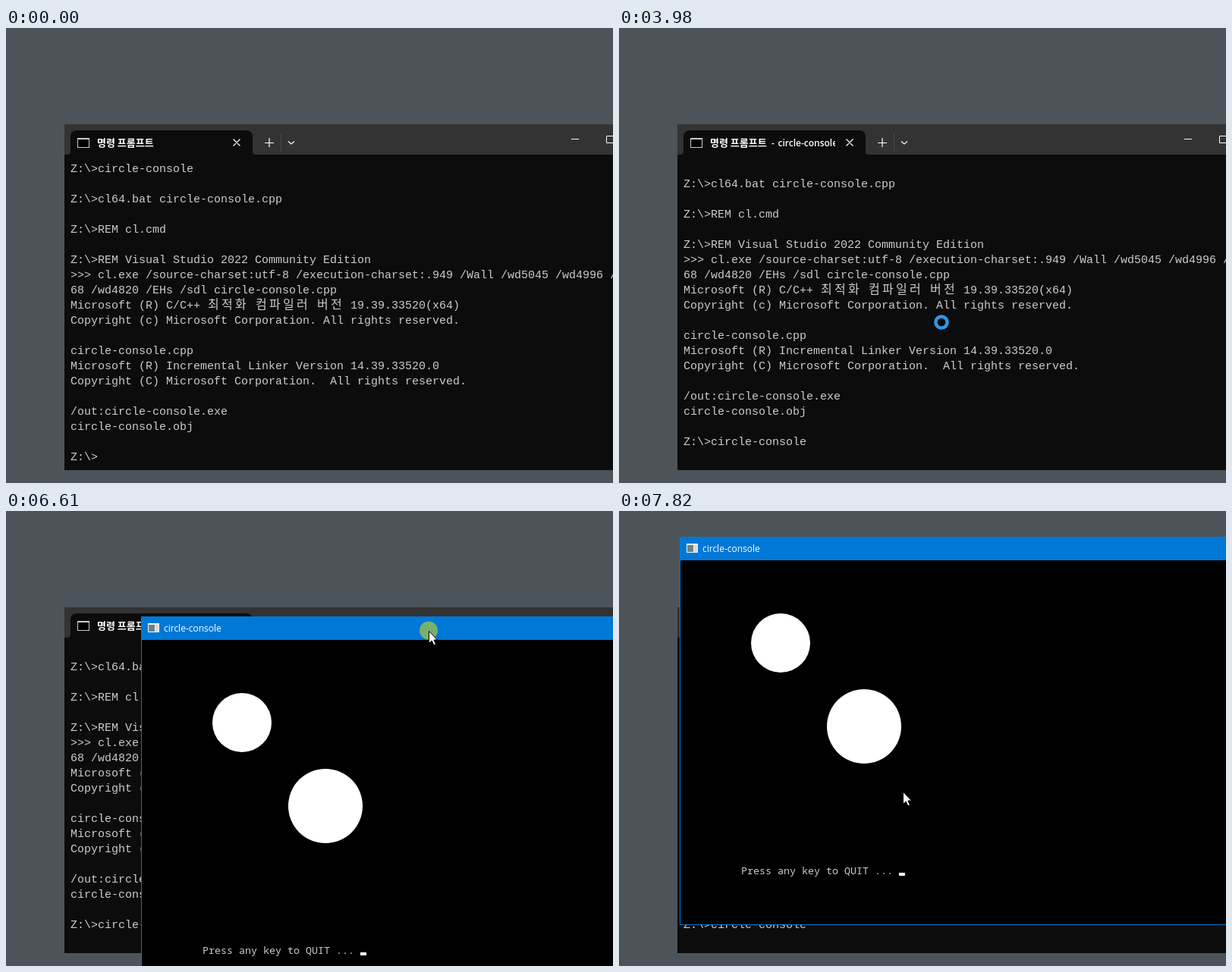
An HTML page with a canvas that plays this animation: 800x600 px, repeating every 8000 ms.

```html
<!DOCTYPE html>
<html lang="ko">
<head>
<meta charset="utf-8">
<title>circle-console</title>
<style>
html, body { margin: 0; height: 100%; overflow: hidden; background: #4c545a; }
canvas { display: block; }
</style>
</head>
<body>
<canvas id="stage" width="800" height="600"></canvas>
<script>
const ctx = document.getElementById('stage').getContext('2d');
const LOOP = 8000, BLUE = '#0078d7';
const MONO = '"Liberation Mono", monospace';
const SANS = '"Open Sans", "Noto Sans CJK KR", "Noto Sans CJK", sans-serif';
const HANGUL = '"Noto Sans CJK KR", "Noto Sans CJK", sans-serif';

const log = String.raw`Z:\>circle-console

Z:\>cl64.bat circle-console.cpp

Z:\>REM cl.cmd

Z:\>REM Visual Studio 2022 Community Edition
>>> cl.exe /source-charset:utf-8 /execution-charset:.949 /Wall /wd5045 /wd4996 /wd46
68 /wd4820 /EHs /sdl circle-console.cpp
Microsoft (R) C/C++ 최적화 컴파일러 버전 19.39.33520(x64)
Copyright (c) Microsoft Corporation. All rights reserved.

circle-console.cpp
Microsoft (R) Incremental Linker Version 14.39.33520.0
Copyright (C) Microsoft Corporation.  All rights reserved.

/out:circle-console.exe
circle-console.obj
`.split('\n');

function rect(x, y, w, h, color) {
  ctx.fillStyle = color;
  ctx.fillRect(x, y, w, h);
}

function disc(x, y, r, color) {
  ctx.fillStyle = color;
  ctx.beginPath();
  ctx.arc(x, y, r, 0, 7);
  ctx.fill();
}

function text(s, x, y, font, color) {
  ctx.font = font;
  ctx.fillStyle = color;
  ctx.fillText(s, x, y);
}

// Each line is a list of coordinates: [x, y, x, y, ...]
function strokes(color, width, ...lines) {
  ctx.strokeStyle = color;
  ctx.lineWidth = width;
  ctx.beginPath();
  for (const p of lines)
    for (let i = 0; i < p.length; i += 2)
      i ? ctx.lineTo(p[i], p[i + 1]) : ctx.moveTo(p[i], p[i + 1]);
  ctx.stroke();
}

// Hangul takes two 9 px cells
function termLine(s, y) {
  let x = 85;
  for (const run of s.match(/[가-힣]|[^가-힣]+/g) || []) {
    const wide = run >= '가';
    text(run, x + (wide ? 1 : 0), y, wide ? '300 16px ' + HANGUL : '15px ' + MONO, '#ccc');
    x += wide ? 18 : run.length * 9;
  }
}

function terminal(t) {
  const focus = t >= 1150 && t < 3980, running = t >= 3160;
  if (focus) rect(76, 126, 724, 458, BLUE);
  rect(77, 127, 723, 456, '#0c0c0c');
  rect(77, 127, 723, 40, focus ? '#2d2d2d' : '#333');

  ctx.fillStyle = '#0c0c0c';
  ctx.beginPath();
  ctx.moveTo(81, 167);
  ctx.quadraticCurveTo(85, 167, 85, 163);
  ctx.arcTo(85, 135, 93, 135, 8);
  ctx.arcTo(325, 135, 325, 143, 8);
  ctx.lineTo(325, 163);
  ctx.quadraticCurveTo(325, 167, 329, 167);
  ctx.fill();

  rect(94, 145, 16, 13, '#ccc');
  rect(95, 147, 14, 10, '#000');
  text('명령 프롬프트', 120, 156, 'bold 13px ' + HANGUL, '#fff');
  if (running) {
    ctx.save();
    ctx.beginPath();
    ctx.rect(200, 135, 85, 32);
    ctx.clip();
    text('-', 201, 156, '600 12px ' + SANS, '#fff');
    text('circle-console', 209.5, 156, '600 12px ' + SANS, '#fff');
    ctx.restore();
  }

  strokes('#fff', 1.2, [299.5, 146.5, 308.5, 155.5], [308.5, 146.5, 299.5, 155.5],
    [341, 151.5, 353, 151.5], [347, 145, 347, 157], [372, 149.5, 376, 153, 380, 149.5]);
  strokes('#4a4a4a', 1, [362.5, 139, 362.5, 163]);
  strokes('#fff', 1, [745, 146.5, 755, 146.5], [800, 142.5, 791.5, 142.5, 791.5, 151.5, 800, 151.5]);

  const command = t < 2160 ? '' : t < 2560 ? 'cl64.bat circle-console.cpp' : 'circle-console';
  const rows = [...log, 'Z:\\>' + command];
  rows.forEach((s, i) => {
    const row = running ? i - 1 : i;
    if (row >= 0) termLine(s, 190 + row * 20);
  });

  const caretOn = focus && !(t >= 1540 && t < 1960) && !(t >= 2960 && t < 3160) && !(t >= 3370 && t < 3580);
  if (caretOn) rect(running ? 85 : 121 + command.length * 9, 555, 1, 20, '#fff');
}

function popup([x, y], t) {
  rect(x, y, 800, 512, BLUE);
  rect(x + 1, y + 31, 800, 480, '#000');

  rect(x + 9, y + 9, 15, 12, '#f2f2f2');
  rect(x + 10, y + 11, 8, 9, '#6d8088');
  rect(x + 19, y + 11, 4, 9, '#d5dade');
  text('circle-console', x + 30, y + 20, '12px ' + SANS, '#fff');

  if (t < 4400) return;
  disc(x + 133, y + 140, 39, '#fff');
  disc(x + 243, y + 250, 49, '#fff');
  text('Press any key to QUIT ...', x + 81, y + 445, '300 13.333px "Noto Sans Mono", ' + MONO, '#ccc');
  rect(x + 289, y + 443, 8, 4, '#fff');
}

function pointer([x, y], pressed) {
  if (pressed) disc(x, y - 0.5, 12, 'rgba(200,213,40,.6)');
  ctx.save();
  ctx.translate(x + 0.5, y + 0.5);
  ctx.beginPath();
  [[0, 0], [0, 16], [3.7, 12.6], [6.4, 18.4], [9, 17.3], [6.4, 11.6], [11, 11.4]]
    .forEach(p => ctx.lineTo(...p));
  ctx.closePath();
  ctx.fillStyle = '#fff';
  ctx.fill();
  ctx.strokeStyle = '#000';
  ctx.lineWidth = 1;
  ctx.stroke();
  ctx.restore();
}

const lerp = (a, b, k) => a.map((v, i) => Math.round(v + (b[i] - v) * k));
const tick = (t, start) => Math.min(5, Math.floor((t - start) / 200));

const REST = [425, 388], GRAB = [567, 180];
const glide = [[524, 119], [489, 81], [456, 53], [445, 105], [402, 270], [374, 370]];
const drag = [[146, 100], [113, 62], [80, 34]];

function pointerAt(t) {
  if (t < 1350) return lerp([792, 439], REST, Math.min(1, tick(t, 350) / 3));
  if (t < 5610) return REST;
  if (t < 6610) return lerp(REST, GRAB, Math.min(1, (tick(t, 5610) + 1) / 4));
  return t < 6820 ? [557, 158] : glide[tick(t, 6820)];
}

function popupAt(t) {
  if (t < 6610) return [188, 161];
  return t < 6820 ? [178, 139] : drag[Math.min(2, tick(t, 6820))];
}

function draw(t) {
  rect(0, 0, 800, 600, '#4c545a');
  terminal(t);
  if (t >= 4200) popup(popupAt(t), t);

  const pressed = t >= 1150 && t < 1350 || t >= 6410 && t < 7420;
  if (t >= 3980 && t < 4400) {
    ctx.strokeStyle = '#2f97e8';
    ctx.lineWidth = 4.5;
    ctx.beginPath();
    ctx.arc(...REST, 7.6, 0, 7);
    ctx.stroke();
  } else if (t >= 350 && t < 2160 || t >= 4400) {
    pointer(pointerAt(t), pressed);
  }
}

const begin = performance.now();
function loop() {
  draw((performance.now() - begin) % LOOP);
  requestAnimationFrame(loop);
}
loop();
</script>
</body>
</html>
```
